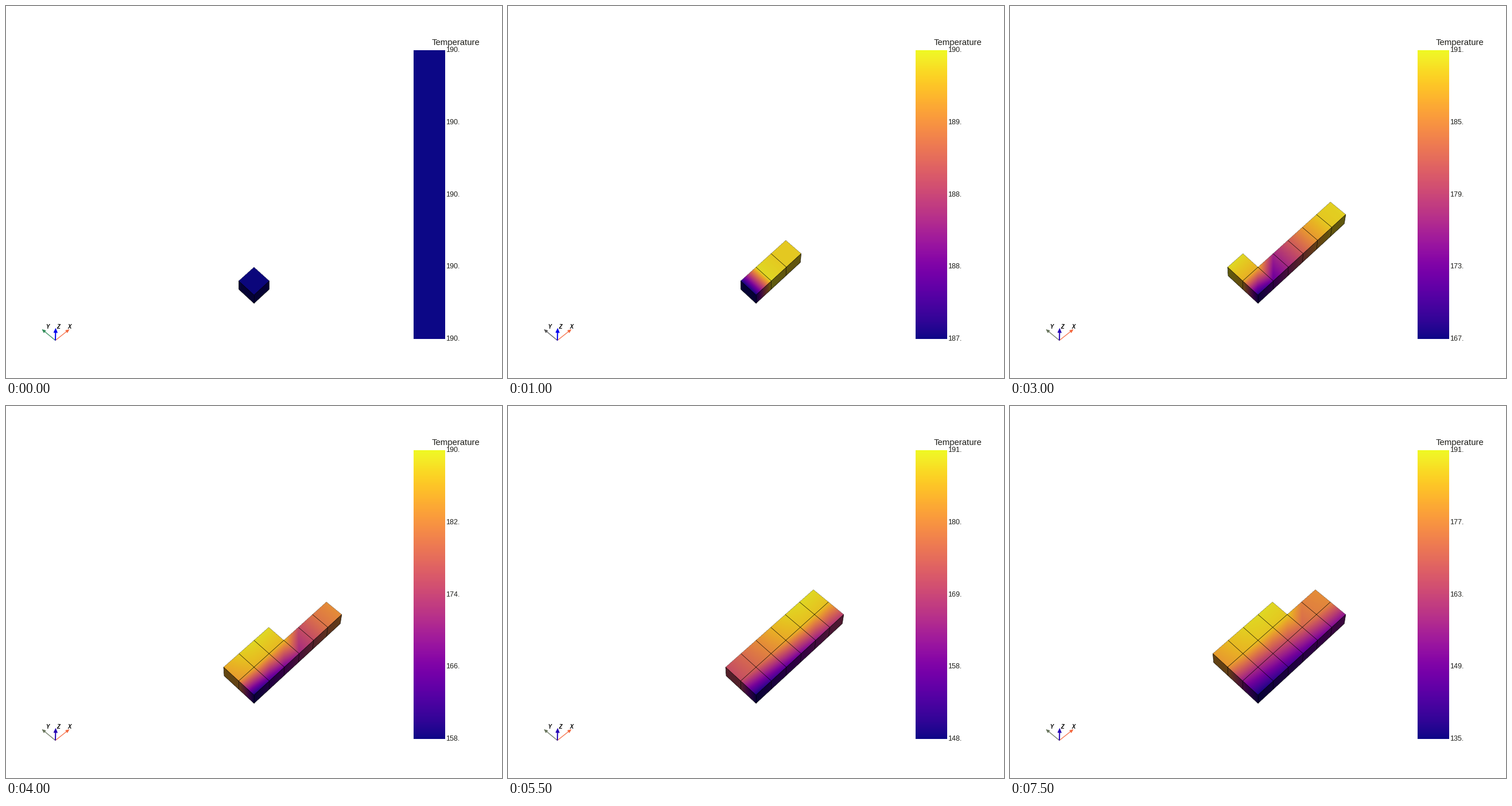
A matplotlib script that plays this animation: 864 by 648 pixels, repeating every 8 s.

```python
import numpy as np
import matplotlib.pyplot as plt
from matplotlib.animation import FuncAnimation
from matplotlib.collections import LineCollection

W, H = 864, 648
COLS, ROWS, FRAMES = 6, 3, 16
TOP_SHADE, SIDE_SHADE = 0.915, 0.39
LOW = [190, 189, 187, 182, 177, 172, 167, 162.5, 158, 155, 151,
       147.6, 145, 141.8, 138.5, 135]
HIGH = [190, 190, 190, 190, 190, 191, 191, 191, 190, 191, 191,
        190.6, 191, 192.1, 191, 191]
AGES = [0, 1, 2, 3, 6, 8, 11, 13, 15]
DROPS = [0, 1, 4, 9, 22.8, 30.8, 41.5, 48, 54]
plasma = plt.get_cmap("plasma")

# Homogeneous perspective basis: corner, along X, along Y, downwards
O = np.array([432, 503.5, 1])
X = np.array([31.32, -19.75, 0.01])
Y = np.array([-22.68, -19.75, 0.01])
Z = np.array([7.776, 23.8, 0.018])


def project(i, j, z=0):
    p = O + i * X + j * Y + z * Z
    return p[:2] / p[2]


# Half-pixel sampling grid over the part of the stage that holds the blocks
X0, X1, Y0, Y1 = 340, 600, 305, 530
gx, gy = np.meshgrid(np.arange(X0, X1, 0.5) + 0.25,
                     np.arange(Y0, Y1, 0.5) + 0.25)


def plane_coords(u, v):
    inv = np.linalg.inv(np.column_stack([u, v, O]))
    a, b, c = np.tensordot(inv, np.stack([gx, gy, np.ones_like(gx)]), 1)
    return a / c, b / c


top_u, top_v = plane_coords(X, Y)
right_u, right_z = plane_coords(X, Z)
left_v, left_z = plane_coords(Y, Z)
cell_i = np.clip(np.floor(top_u).astype(int), 0, COLS - 1)
cell_j = np.clip(np.floor(top_v).astype(int), 0, ROWS - 1)
in_grid = (top_u >= 0) & (top_u <= COLS) & (top_v >= 0) & (top_v <= ROWS)


def node_values(n):
    """Normalised temperature of every grid node, by time since last heated."""
    last = np.full((ROWS + 1, COLS + 1), -1)
    for k in range(n + 1):
        j, i = divmod(k, COLS)
        last[j:j + 2, i:i + 2] = k
    age = (n - last).astype(float)
    if n < 3:
        return np.where(age == n, 0, 0.93 + 0.04 * age)
    age[:, COLS] = np.maximum(age[:, COLS] - 0.5, 0)
    drop = np.interp(age, AGES, DROPS)
    row = np.arange(ROWS + 1)[:, None]
    shared = (row > 0) & (last >= COLS * row)
    drop += shared * 2.5 * np.clip(1 - age / 5, 0, 1)
    return np.clip(0.97 - drop / (HIGH[n] - LOW[n]), 0, 1)


def top_values(v):
    """Linear interpolation on two triangles per cell."""
    i, j = cell_i, cell_j
    fu, fv = top_u - i, top_v - j
    a, b, c, d = v[j, i], v[j, i + 1], v[j + 1, i], v[j + 1, i + 1]
    return np.where(fu >= fv, a + fu * (b - a) + fv * (d - b),
                    a + fv * (c - a) + fu * (d - c))


def paint(n):
    v = node_values(n)
    img = np.ones(gx.shape + (3,))

    def fill(mask, vals, shade):
        img[mask] = plasma(vals[mask])[:, :3] * shade

    def side(t, z, count, vals):
        mask = (t >= 0) & (t <= count) & (z >= 0) & (z <= 1)
        fill(mask, np.interp(t, np.arange(len(vals)), vals), SIDE_SHADE)

    side(right_u, right_z, min(n + 1, COLS), v[0])
    side(left_v, left_z, n // COLS + 1, v[:, 0])
    fill(in_grid & (cell_j * COLS + cell_i <= n), top_values(v), TOP_SHADE)
    h, w = gx.shape
    return img.reshape(h // 2, 2, w // 2, 2, 3).mean((1, 3))


def edges(n):
    solid, back = [], []

    def seg(group, a, b):
        group.append([project(*a), project(*b)])

    for k in range(n + 1):
        j, i = divmod(k, COLS)
        seg(solid, (i, j), (i + 1, j))
        seg(solid, (i, j), (i, j + 1))
        if k + COLS > n:
            seg(back, (i, j + 1), (i + 1, j + 1))
        if i == COLS - 1 or k == n:
            seg(back, (i + 1, j), (i + 1, j + 1))
        if j == 0:
            seg(solid, (i + 1, 0), (i + 1, 0, 1))
            seg(solid, (i, 0, 1), (i + 1, 0, 1))
        if i == 0:
            seg(solid, (0, j + 1), (0, j + 1, 1))
            seg(solid, (0, j, 1), (0, j + 1, 1))
    seg(solid, (0, 0), (0, 0, 1))
    return solid, back


fig = plt.figure(figsize=(W / 72, H / 72), dpi=72, facecolor="white")
ax = fig.add_axes([0, 0, 1, 1])
ax.axis("off")

blocks = ax.imshow(np.ones((Y1 - Y0, X1 - X0, 3)), extent=(X0, X1, Y1, Y0),
                   interpolation="nearest")
ramp = np.linspace(1, 0, 256)[:, None]
bar = ax.imshow(ramp, cmap=plasma, vmin=0, vmax=1,
                extent=(709.5, 764.5, 580, 77.5), interpolation="nearest")
ax.set_aspect("auto")
ax.set_xlim(0, W)
ax.set_ylim(H, 0)

solid_lines = LineCollection([], colors="black", linewidths=0.6)
back_lines = LineCollection([], colors="#333333", linewidths=0.5,
                            linestyles=[(0, (2.5, 1.5))])
ax.add_collection(solid_lines)
ax.add_collection(back_lines)

INK = "#1c1c18"
ax.text(783, 68, "Temperature", size=14.9, color=INK, ha="center",
        va="baseline", family="Liberation Sans")
labels = [ax.text(766.5, 583 - 125.75 * k, "", size=12.5, color=INK,
                  va="baseline", family="Liberation Sans") for k in range(5)]


def arrow(tip, color, width, head, half):
    start, tip = np.array([86, 582.5]), np.array(tip)
    d = (tip - start) / np.linalg.norm(tip - start)
    base, side = tip - d * head, np.array([-d[1], d[0]]) * half
    line, = ax.plot(*zip(start, base), color=color, lw=width,
                    solid_capstyle="butt")
    cone, = ax.fill(*zip(tip, base + side, base - side), color=color, lw=0.6)
    return line, cone


arrow((110, 563.5), "#f4683f", 1.2, 6, 2.6)
y_arrow = arrow((63, 563.5), "#2e8b57", 1.2, 6, 2.6)
z_arrow = arrow((86.5, 561.5), "#0000ee", 2, 7.5, 3.3)
for x, name in ((72, "Y"), (91, "Z"), (111, "X")):
    ax.text(x, 562.5, name, size=9.5, ha="center", va="baseline",
            style="italic", weight="bold", family="Liberation Sans")


def update(n):
    blocks.set_data(paint(n))
    bar.set_data(ramp if n else ramp * 0)
    solid, back = edges(n)
    solid_lines.set_segments(solid)
    back_lines.set_segments(back)
    for label, t in zip(labels, np.linspace(LOW[n], HIGH[n], 5)):
        label.set_text(f"{t:.0f}.")
    y_color = "#2e8b57" if n == 0 else "#555555" if n < 4 else "#66735a"
    for part in y_arrow:
        part.set_color(y_color)
    for part in z_arrow:
        part.set_color("#0000ee" if n < 4 else "#2200b4")
    return []


anim = FuncAnimation(fig, update, frames=FRAMES, interval=500,
                     repeat=True, repeat_delay=0, blit=False)
plt.show()
```
